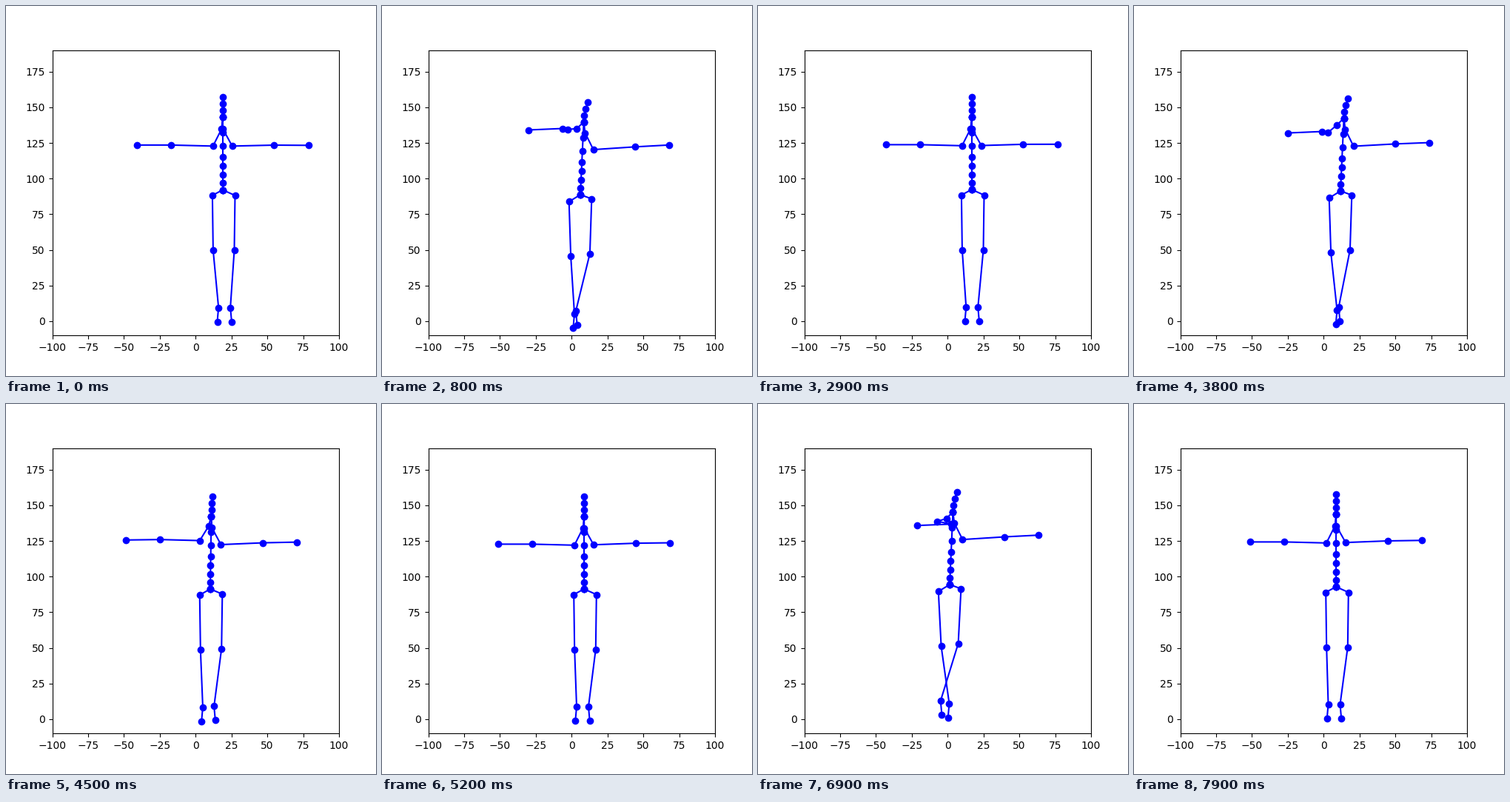
Write a matplotlib script that moves like this. It is 500 px wide and 500 px high and loops after 8000 ms.

```python
import numpy as np
import matplotlib.pyplot as plt
from matplotlib.animation import FuncAnimation

FRAMES, STEP = 80, 100
CYCLE = 3050                  # ms from one reach to the next
PEAKS = (83, 84, 109)         # swing of the reaching arm, degrees

# Vertebrae from pelvis to crown, in stage pixels.
SPINE = np.cumsum([0, 9.5, 11, 11.7, 12.3, 14.7, 18.3, 21, 9, 9, 9])
NECK = 7
UPPER_ARM, FOREARM = 56.6, 46.2
HIP, KNEE, ANKLE, FOOT = 7.5, 81.5, 159, 178

# Drift of the body: time, pelvis x, pelvis y, sideways sway of the feet.
KEYS = np.array([
    (0, 292.7, 248.5, 1),
    (800, 268, 255, -7),
    (1700, 293, 249, -2),
    (2300, 286, 249, -2),
    (2700, 291.5, 248.5, -1),
    (3400, 277.5, 246, -1),
    (3800, 279, 250, -3.5),
    (5200, 273, 250, -3.5),
    (6300, 280.5, 248.5, -2),
    (6500, 262, 247, -3),
    (6900, 259, 244, -6.5),
    (7900, 273, 247, -4),
])


def ease(u):
    u = np.clip(u, 0, 1)
    return u * u * (3 - 2 * u)


def drift(t):
    i = min(np.searchsorted(KEYS[:, 0], t, side="right"), len(KEYS) - 1)
    a, b = KEYS[i - 1], KEYS[i]
    return (a + (b - a) * ease((t - a[0]) / (b[0] - a[0])))[1:]


def reach(t):
    """Swing out, hold, swing back, once per cycle."""
    n, phase = divmod(t, CYCLE)
    pulse = ease((phase - 250) / 550) * (1 - ease((phase - 1100) / 500))
    return np.radians(PEAKS[int(n)] * pulse)


def skeleton(t):
    """Chains of joints in stage pixels, y downwards."""
    x, y, sway = drift(t)
    angle = reach(t)
    turn, fold = np.sin(angle), np.cos(angle)
    past = max(0, -fold)      # how far the arm crosses the chest

    nod = np.clip(np.arange(len(SPINE)) - NECK, 0, None)
    lean = 4.7 * np.minimum(SPINE / SPINE[NECK], 1) + 0.65 * nod ** 2
    spine = np.column_stack([x + turn * lean, y - SPINE])
    neck = spine[NECK]

    # The left arm folds forward as its shoulder comes up.
    shoulder = np.array([-13 - 8.5 * turn,
                         39.3 + turn * (2.6 * (sway + 3.5) - 20)])
    elbow = shoulder + (-UPPER_ARM * fold, 16 * past - 1.4)
    hand = elbow + (-FOREARM, 2 * turn)
    left = neck + [(0, 0), (-1.3 - 8 * turn, 16 - 7 * turn),
                   shoulder, elbow, hand]

    # The right arm stays spread and rises a little.
    lift = 0.5 * (1 - sway) + 3 * turn
    right = neck + [(0, 0), (0.3 + 1.5 * turn, 16 - turn),
                    (13, 39.3 - 0.25 * lift),
                    (13 + UPPER_ARM, 38 - 0.6 * lift),
                    (13 + UPPER_ARM + FOREARM, 38.3 - lift)]

    stance = 8 * fold - 10 * past
    mid = 1.5 * (1 - turn)

    def leg(side):
        tilt = -2 * side * turn
        return [(x, y),
                (x + mid + 15.3 * side, y + HIP + tilt),
                (x + mid + side * (12.7 + 0.2 * stance), y + KEYS_KNEE + tilt),
                (x + mid + sway + side * stance, y + ANKLE + tilt),
                (x + mid + sway + side * (stance + 1.7), y + FOOT + tilt)]

    KEYS_KNEE = KNEE
    return [spine, left, right, leg(-1), leg(1)]


fig, ax = plt.subplots(figsize=(5, 5), dpi=100)
fig.subplots_adjust(left=0.125, right=0.9, bottom=0.11, top=0.88)
ax.set_xlim(-100, 100)
ax.set_ylim(-10, 190)
lines = [ax.plot([], [], "bo-")[0] for _ in range(5)]


def draw(n):
    for line, chain in zip(lines, skeleton(n * STEP)):
        px, py = np.transpose(chain)
        line.set_data((px - 256.25) / 1.9375, (425.75 - py) / 1.925)
    return lines


anim = FuncAnimation(fig, draw, frames=FRAMES, interval=STEP,
                     repeat=True, repeat_delay=0)
plt.show()
```
